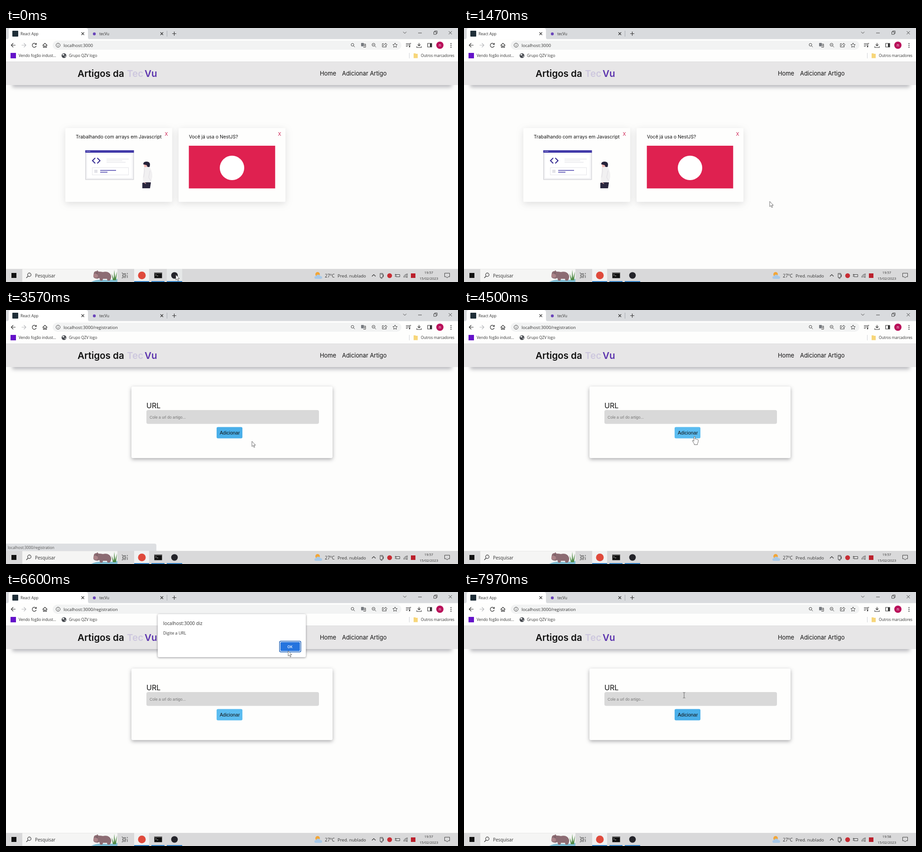
An HTML page for the animation above (8000 ms loop, 998 px wide and 561 px high).

```html
<!DOCTYPE html>
<html lang="pt-BR">
<head>
<meta charset="utf-8">
<title>Artigos</title>
<style>
  html, body { margin: 0; width: 100%; height: 100%; overflow: hidden; background: #fdfdfc; }
  svg { display: block; width: 998px; height: 561px; font-family: "Open Sans", sans-serif; font-size: 8.4px; fill: #333; }
  .page { font-family: Inter, sans-serif; font-size: 10.3px; fill: #111; }
  .form { font-family: "Liberation Sans", Arial, sans-serif; }
  .line { fill: none; stroke: #333; stroke-width: 1.2; }
  .thin { stroke-width: .9; }
  .card { fill: #fefefd; filter: drop-shadow(0 4px 8px rgba(70, 70, 80, .17)); }
  .panel { fill: #fefefd; filter: drop-shadow(0 3px 4px rgba(40, 40, 48, .38)); }
  .popup { fill: #fff; filter: drop-shadow(0 1px 2px rgba(30, 30, 40, .5)); }
  .remove { fill: #cc1d4f; }
</style>
</head>
<body>
<svg viewBox="0 0 998 561">
  <rect width="998" height="561" fill="#fdfdfc"/>

  <g class="page">
    <rect x="14" y="112" width="970" height="19" fill="#8c8c94" opacity=".6" style="filter:blur(4.5px)"/>
    <rect y="74" width="998" height="52" fill="#e7e6e7"/>
    <g font-size="20.600" font-weight="600">
      <text x="158" y="108">Artigos da</text>
      <text x="267" y="108" fill="#cdc7de">Tec</text>
      <text x="306" y="108" fill="#5a32ad">Vu</text>
    </g>
    <g font-size="12.9">
      <text x="693" y="105">Home</text>
      <text x="742" y="105">Adicionar Artigo</text>
    </g>

    <g id="home">
      <rect class="card" x="131" y="221" width="236" height="163" rx="2"/>
      <rect class="card" x="381" y="221" width="236" height="163" rx="2"/>
      <text x="154" y="244">Trabalhando com arrays em Javascript</text>
      <text x="404" y="244">Você já usa o NestJS?</text>
      <text class="remove" x="350.5" y="238">X</text>
      <text class="remove" x="600.5" y="238">X</text>

      <rect x="176" y="271" width="105.500" height="63.5" fill="#fff" stroke="#d9d9dd" stroke-width="2"/>
      <rect x="178.500" y="278" width="100" height="54" fill="none" stroke="#ececf0"/>
      <rect x="175" y="270" width="107.500" height="5.500" fill="#4038a8"/>
      <path d="M178 272.500h8" stroke="#fff" stroke-dasharray="1.500 1.500"/>
      <path d="M197 287l-6 6 6 6M201.500 287l6 6-6 6" fill="none" stroke="#392f94" stroke-width="2.200"/>
      <path d="M222 289.500h49M222 293h35M222 296.500h42" stroke="#dcdce2"/>
      <rect x="190.500" y="308.500" width="80" height="16" fill="none" stroke="#e4e4e8"/>
      <rect x="195" y="313" width="7" height="7" fill="#e3e3e8"/>
      <path d="M208 314.500h35M208 318.500h16" stroke="#4038a8" stroke-width="1.500"/>

      <path d="M304 300h9v10h-7z" fill="#f3b9b5"/>
      <path d="M303 301q0-6 7-6 8 0 8 7l-1 5h-5l-1-4z" fill="#25233a"/>
      <path d="M305 308q9-4 14 2 4 8 4 18-1 8-4 14h-15q-3-8-1-18z" fill="#f1f0f1"/>
      <path d="M305 309l1 8-2 13M318 315l-3 15 5 8" fill="none" stroke="#d8d6dc" stroke-width=".8"/>
      <path d="M301 342q8-2 19-1l-2 13h-17z" fill="#29263e"/>
      <path d="M305 341l4 3" stroke="#f3b9b5" stroke-width="1.500"/>

      <rect x="403.700" y="260" width="190.600" height="94.300" fill="#df2150"/>
      <circle cx="499" cy="309" r="27" fill="#fff"/>
    </g>

    <g id="registration">
      <rect class="panel" x="277" y="169" width="444" height="158" rx="3"/>
      <text x="310" y="217" font-size="16">URL</text>
      <rect x="310" y="221" width="381" height="30.500" rx="4" fill="#d9d9d9"/>
      <rect id="button" x="465" y="258.500" width="57" height="25" rx="3"/>
      <g class="form">
        <text x="317" y="239.500" font-size="8.600" fill="#777">Cole a url do artigo...</text>
        <text x="472" y="274.500" font-size="10.600">Adicionar</text>
      </g>
    </g>
  </g>

  <!-- browser -->
  <rect width="998" height="25" fill="#d9dbde"/>
  <path d="M2 25q4 0 4-5V5q0-5 5-5h165q5 0 5 5v15q0 5 4 5z" fill="#fff"/>
  <rect y="24.500" width="998" height="49.500" fill="#fefefd"/>
  <path d="M0 74.500h998" stroke="#dededf"/>
  <rect x="14" y="6" width="13" height="13" rx="1" fill="#1f2e38"/>
  <circle cx="195" cy="13" r="3.200" fill="#6a45ba"/>
  <text x="32" y="15.500" font-size="8.500">React App</text>
  <text x="206" y="15.500" font-size="8.500">tecVu</text>
  <path class="line" d="M166.500 9.500l6 6m0-6l-6 6M341 9.500l6 6m0-6l-6 6M367 12.500h9m-4.500-4.500v9"/>
  <path d="M355.500 6v13" stroke="#a5a8ae"/>
  <path class="line thin" d="M877 8.500l3.500 3.500 3.500-3.500M910 11h8M944.500 8.500h5.500v5.500h-5.500zM946.500 8.500v-2h5.500v5.500h-2M977.500 7l7 7m0-7l-7 7"/>

  <rect x="103" y="28" width="770" height="20" rx="10" fill="#f2f3f3"/>
  <path class="line" d="M21 38H11.500m4.500-4.500l-4.500 4.500 4.500 4.500"/>
  <path class="line" style="stroke:#b5b7ba" d="M34.500 38H44m-4.500-4.500l4.500 4.500-4.500 4.500"/>
  <path class="line" d="M66.500 36a4.500 4.500 0 1 0 .3 3.500M67 33v3.500h-3.500M81 38.500l5-5 5 5M82.500 37.500V43h2.500v-3.500h2V43h2.500v-5.500"/>
  <g class="line thin">
    <circle cx="115" cy="38" r="4.500"/>
    <path d="M115 37.500v3M115 35.300v1"/>
    <circle cx="765" cy="37" r="3"/><path d="M767.200 39.200l3 3"/>
    <circle cx="811.500" cy="37" r="3.300"/><path d="M814 39.500l3 3M810 37h3"/>
    <path d="M834 34.500h-3V42h8.500v-2.500M833 40q0-4.500 5-4.500v-2l3.500 3.200-3.500 3.200v-2"/>
    <path d="M859 33l1.500 3.300 3.500.4-2.600 2.400.7 3.500-3.100-1.800-3.100 1.800.7-3.500-2.600-2.400 3.500-.4z"/>
    <path d="M788.500 35.500h5.500v7h-5M790.500 38h3m-1.500 0q0 2-1.500 3"/>
  </g>
  <rect x="784" y="33" width="6" height="7.500" rx="1" fill="#777b80"/>
  <path class="line" d="M883 34.500h7M883 37.500h7M883 40.500h4M891.500 41v-7h3M912 33v6m-3-2.500l3 3 3-3M907 40.500v2.500h10v-2.500M931 34h9v8h-9z"/>
  <rect x="936" y="34" width="4" height="8"/>
  <circle cx="891" cy="41" r="1.500"/>
  <circle cx="958" cy="38" r="8" fill="#b90f59"/>
  <text x="958" y="41" fill="#fff" text-anchor="middle" font-size="9">n</text>
  <path d="M982.500 33.500v10" stroke="#333" stroke-width="2" stroke-dasharray="2 2"/>
  <text id="address" x="127" y="41.500" font-size="9.650"></text>

  <rect x="10" y="55" width="12" height="12" fill="#6412c9"/>
  <text x="28" y="64">Vendo fogão indust...</text>
  <circle cx="128" cy="61" r="5.300" fill="#4a4d52"/>
  <path d="M124 59l3-2 2 2-2 2zM129 63l3-2-1 3z" fill="#fff"/>
  <text x="139" y="64">Grupo QZV logo</text>
  <path d="M890.500 55v12" stroke="#cfd1d5"/>
  <path d="M900 56h4l1 1h4v9.500h-9z" fill="#f7d679"/>
  <text x="990" y="64" text-anchor="end" font-size="8.200">Outros marcadores</text>

  <g id="status">
    <path d="M0 516h328q4 0 4 4v12H0z" fill="#dddfe2"/>
    <text x="4" y="527.500" font-size="8.250" fill="#555">localhost:3000/registration</text>
  </g>

  <!-- taskbar -->
  <rect y="532" width="998" height="29" fill="#d9d9da"/>
  <rect x="12" y="541" width="11" height="11" fill="#111"/>
  <rect x="36" y="532.500" width="210" height="28" fill="#f5f5f4"/>
  <g class="line"><circle cx="51.500" cy="545" r="3.800"/><path d="M48.800 548l-4 4"/></g>
  <text x="64" y="550.500" font-size="9.900">Pesquisar</text>
  <path d="M188 561q10-6 28-5t30-2v7z" fill="#83bfd4"/>
  <path d="M236 557l-3-15 5 12 1-20 2 18 4-14-2 19z" fill="#4e8a45"/>
  <path d="M194 541q1-4 6-4l2-2 2 3q6 0 10 1 14-3 18 8 1 6-3 11h-5l-1-4h-9l-1 4h-5l-2-6q-3 3-9 1-5-2-4-6z" fill="#8c6c73"/>
  <path d="M193 546q1-4 6-3 5 2 4 6-2 4-7 2-4-1-3-5z" fill="#ab8388"/>
  <circle cx="201" cy="541" r=".8"/>
  <path class="line thin" d="M257 542.500h8M257 551h8M257.500 545h7v3.500h-7zM268 541v3M268 546v6M256.500 540v2M256.500 551v2"/>
  <rect x="283" y="532" width="33" height="29" fill="#f0f1f1"/>
  <rect id="taskHover" x="355" y="532" width="34" height="29" fill="#e6e8e8"/>
  <circle cx="300" cy="546.500" r="8.500" fill="#df4a3c"/>
  <rect x="327.500" y="540" width="17" height="12.500" fill="#111"/>
  <path d="M328 541.200h16" stroke="#aaa"/>
  <path d="M330 544l2 1.500-2 1.500M333 547.500h3" fill="none" stroke="#eee" stroke-width=".8"/>
  <circle cx="372" cy="546.500" r="7.300" fill="#24242a"/>
  <path d="M283 560h33M321 560h29M355 560h34" stroke="#2c7cc2" stroke-width="2"/>

  <circle cx="688" cy="544" r="5" fill="#f2a638"/>
  <path d="M684 554q-3 0-3-3t4-3q1-4 5-3 3 0 4 3 4 0 4 3t-3 3z" fill="#a8c9e8"/>
  <text x="704" y="550.500" font-size="9.900">27°C</text>
  <text x="732" y="550.500" font-size="9.600">Pred. nublado</text>
  <path class="line" d="M808 548.500l4-4 4 4"/>
  <path class="line thin" d="M826 542h6v9h-6zM827.500 544h3M828 551v2h3M831 545h2.500v4H831M861 544.500h8.500v5H861zM860 543v3M858.500 545.500h2M858.500 548.500h2M968.500 541.500h11v8H976l-2 2.500-2-2.500h-3.500z"/>
  <circle cx="847" cy="547" r="5.300" fill="#c72d34"/>
  <path class="line thin" d="M878 551q1-7 9-8M880.500 551q1-5 6.500-6M883 551q1-3 4-3.500"/>
  <circle cx="885.500" cy="550.500" r="1"/>
  <rect x="894" y="542" width="10" height="10" fill="#bb202c"/>
  <g text-anchor="middle">
    <text id="clock" x="933.500" y="542.500" font-size="7.600"></text>
    <text x="933.500" y="555.500" font-size="7.750">15/02/2023</text>
  </g>

  <g id="dialog">
    <rect class="popup" x="335" y="49" width="327" height="95" rx="3"/>
    <text x="347" y="73" font-size="10.400">localhost:3000 diz</text>
    <text x="347" y="93.500" font-size="9">Digite a URL</text>
    <rect x="604" y="108.500" width="47" height="24" rx="3" fill="#fff" stroke="#1b5fb8" stroke-width="1.500"/>
    <rect x="606" y="110.500" width="43" height="20" rx="2" fill="#2574de"/>
    <text x="627" y="123.500" fill="#fff" font-size="8" font-weight="600" text-anchor="middle">OK</text>
  </g>

  <g id="cursor" fill="#fff" stroke="#444" stroke-width=".8" stroke-linejoin="round">
    <path id="arrow" d="M0 0V11.500L2.700 9.200 4.500 13.500 6.300 12.700 4.500 8.500H8Z"/>
    <path id="hand" d="M-1.300 1q1.300-2 2.600 0v5q2-1 2.500.5 2-.8 2.500.7 2-.5 2.200 1.300 0 5-2 8v2h-7v-2l-4-6q-.4-2 1.200-1.500l2 2z"/>
    <path id="beam" d="M-2.500-6h2L0-5.500.5-6h2M0-5.500v11M-2.500 6h2L0 5.500.5 6h2" fill="none"/>
  </g>
</svg>
<script>
const LOOP = 8000;
const NAVIGATE = 3050;
const CLOCK_TICK = 7600;
const LINK = [742, 92, 840, 109];
const BUTTON = [465, 259, 522, 283];
const INPUT = [310, 221, 691, 251];
const TASK = [355, 532, 389, 561];

// time, x, y
const path = [
  [0, 375, 545], [150, 375, 545], [1400, 675, 383], [1550, 675, 383],
  [2430, 807, 110], [2600, 797, 103], [3080, 797, 103], [3570, 543, 290],
  [4200, 532, 287], [4850, 480, 269], [5750, 480, 269], [6600, 623, 130],
  [6750, 625, 122], [7050, 625, 122], [7900, 486, 228], [LOOP, 486, 228]
];

const el = Object.fromEntries([...document.querySelectorAll('[id]')].map(e => [e.id, e]));
const show = (e, on) => { e.style.display = on ? '' : 'none'; };
const ramp = (t, from, to) => Math.min(1, Math.max(0, (t - from) / (to - from)));
const smooth = p => p * p * (3 - 2 * p);
const inside = ([x, y], [x0, y0, x1, y1]) => x >= x0 && x <= x1 && y >= y0 && y <= y1;

function pointer(t) {
  const i = path.findIndex(k => k[0] > t);
  const [t0, x0, y0] = path[i - 1], [t1, x1, y1] = path[i];
  const p = smooth(ramp(t, t0, t1));
  return [x0 + (x1 - x0) * p, y0 + (y1 - y0) * p];
}

function draw(t) {
  const pos = pointer(t);
  const form = t >= NAVIGATE;
  const opened = ramp(t, 5360, 5570) * (1 - ramp(t, 6900, 7050));
  const modal = opened > 0;
  const overButton = form && inside(pos, BUTTON);

  show(el.home, !form);
  show(el.registration, form);
  el.address.textContent = 'localhost:3000' + (form ? '/registration' : '');
  el.clock.textContent = t < CLOCK_TICK ? '19:57' : '19:58';
  el.button.setAttribute('fill', overButton || modal ? '#5bbcf0' : '#4aafe9');
  el.status.style.opacity = ramp(t, 2560, 2640) * (1 - ramp(t, 3640, 3760));
  show(el.taskHover, inside(pos, TASK));

  show(el.dialog, modal);
  el.dialog.style.opacity = opened;
  el.dialog.setAttribute('transform', `translate(0 ${-17 * (1 - opened)})`);

  const hand = inside(pos, LINK) || overButton;
  const beam = form && !modal && inside(pos, INPUT);
  show(el.hand, hand);
  show(el.beam, beam);
  show(el.arrow, !hand && !beam);
  el.cursor.setAttribute('transform', `translate(${pos})`);
}

function frame() {
  draw(performance.now() % LOOP);
  requestAnimationFrame(frame);
}
frame();
</script>
</body>
</html>
```
